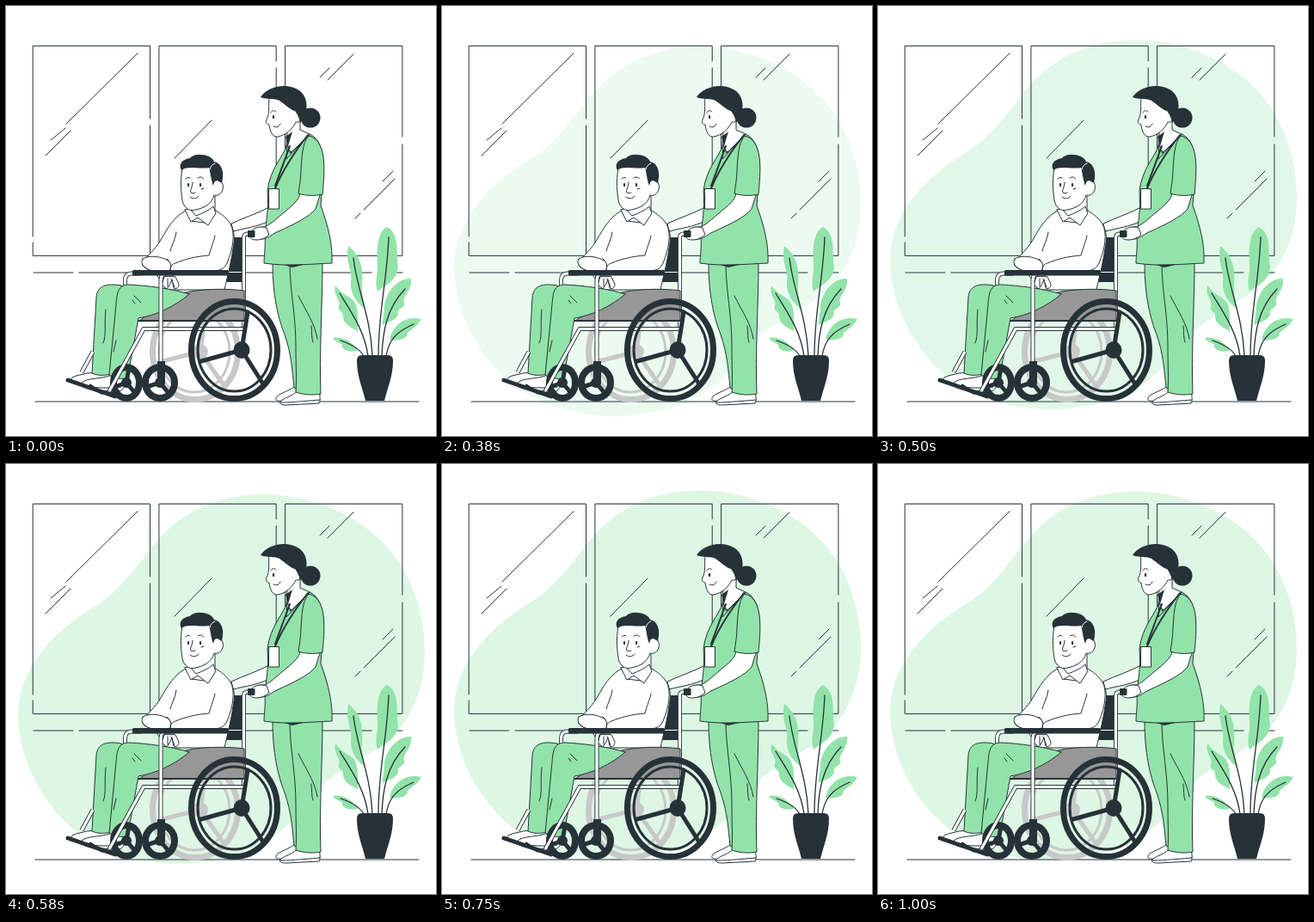
An HTML page that plays this animation: 500x500 px, repeating every 1040 ms.

```html
<!DOCTYPE html>
<html lang="en">
<head>
<meta charset="utf-8">
<title>Nurse and patient</title>
<style>
  html, body { margin: 0; width: 100%; height: 100%; overflow: hidden; background: #fff; }
  svg { display: block; width: 100vw; height: 100vh; }
  path, ellipse, circle, rect { stroke-linecap: round; stroke-linejoin: round; }
  .line { fill: none; stroke: #263238; }
  .white { fill: #fff; stroke: #263238; }
  .gap { fill: none; stroke: #fff; }
  .green { fill: #92e3a9; stroke: #263238; }
  .leaf { fill: #92e3a9; }
  .dark { fill: #263238; }
  .grey { fill: #979797; stroke: #263238; }
  .edge { fill: none; stroke: #263238; stroke-width: 5; stroke-linecap: butt; }
  .core { fill: none; stroke: #fff; stroke-width: 3.2; stroke-linecap: butt; }
</style>
</head>
<body>
<svg viewBox="0 0 500 500">
  <path id="blob" fill="#92e3a9" fill-opacity=".305" d="M300 32C355 32 410 55 445 95C475 130 487 175 487 215C487 255 473 292 447 315C425 335 398 346 375 364C350 384 337 410 318 425C298 441 275 451 250 456C200 467 150 461 105 439C50 410 14 345 14 288C14 238 50 194 103 162C138 142 160 100 188 73C217 46 255 32 300 32Z"/>
  <g id="scene"></g>
</svg>
<script>
const NS = 'http://www.w3.org/2000/svg';
const scene = document.getElementById('scene');

function add(tag, cls, attrs) {
  const el = document.createElementNS(NS, tag);
  if (cls) el.setAttribute('class', cls);
  for (const k in attrs) el.setAttribute(k, attrs[k]);
  scene.append(el);
}
const path = (cls, d, width) => add('path', cls, width ? { d, 'stroke-width': width } : { d });
const oval = (cls, cx, cy, rx, ry = rx) => add('ellipse', cls, { cx, cy, rx, ry });
const tube = d => { path('edge', d); path('core', d); };
const ring = (cx, cy, rx, ry, stroke, width) =>
  add('ellipse', '', { cx, cy, rx, ry, fill: 'none', stroke, 'stroke-width': width });

function room() {
  path('line', 'M167.5 131V46.4H31.2V268M31.2 275V290.4H167.5V139');
  path('line', 'M314.2 64V46.4H177.9V290.4H314.2V72');
  path('line', 'M460.9 152V46.4H324.6V290.4H460.9V161');
  path('line', 'M153 55L70 137M69 142L52 156M75 145L46 174M239 133L196 177' +
    'M376 72L365 83M404 56L374 86M450 192L438 204M452 201L416 237M412 241L406 247');
  path('line', 'M32 310H78M85 310H425M433 310H461M34 460H480');
}

function plant() {
  path('leaf', 'M443 257C431 263 431 285 432 300C433 312 428 320 432 332C440 325 455 320 456 303C453 290 459 265 443 257Z');
  path('leaf', 'M398 279C394 300 404 309 401 321C400 335 408 345 417 352C416 342 413 334 414 325C415 311 416 294 398 279Z');
  path('leaf', 'M471 317C455 316 442 333 440 348C440 359 437 365 438 371C446 367 456 364 456 357C454 352 465 351 463 345C460 338 473 330 471 317Z');
  path('leaf', 'M483 364C465 360 450 370 446 388C453 389 463 388 467 383C464 378 476 377 483 364Z');
  path('leaf', 'M383 325C380 338 390 341 387 349C384 354 394 356 392 362C393 370 401 374 409 378C409 366 410 357 407 348C403 337 392 338 383 325Z');
  path('leaf', 'M380 386C389 384 403 389 409 401C400 403 392 400 391 396C392 391 383 392 380 386Z');
  path('line', 'M445 269C443 320 433 355 433 407M404 293C408 330 424 360 426 407M464 329C442 352 438 380 437 407' +
    'M474 370C453 379 445 389 442 407M388 334C402 357 417 378 421 407M389 389C401 393 411 398 416 407', 1.3);
  path('dark', 'M408 412Q408 406 414 406H444Q450 406 450 412C450 431 444 442 440 459H418C414 442 408 431 408 412Z');
}

function farWheel() {
  const c = '#c8c8c8';
  ring(220, 402, 49.5, 55.5, c, 7);
  ring(219, 402, 41, 47, c, 3);
  add('path', '', { d: 'M226 402L232 357M226 402L182 413M226 402L251 438', stroke: c, 'stroke-width': 5 });
  add('circle', '', { cx: 226, cy: 402, r: 9, fill: c });
}

function nurse() {
  // far arm
  path('white', 'M306 234C293 241 277 246 262 253L264 262C279 258 292 257 306 250Z');
  // legs and shoes
  path('white', 'M335 443C328 448 319 450 315 454C312 458 315 460 321 459L340 456L339 444Z');
  path('green', 'M310 299C310 335 316 362 324 382C332 405 333 425 335 444L342 448L352 299Z');
  path('white', 'M338 448C335 453 325 455 320 459C317 462 319 464 326 464L364 462C366 458 365 453 364 448Z');
  path('line', 'M318 461C330 461 340 460 365 458');
  path('green', 'M330 299C330 330 337 360 337 395C337 420 338 432 337 449C346 452 356 453 366 451C364 408 368 345 368 299Z');
  path('line', 'M340 337C350 357 359 369 362 387M355 372C356 380 355 386 357 391');
  path('dark', 'M317 299H354L333 304Z');
  // neck and face
  path('white', 'M327 143L326 164L334 172L353 149L342 144V128Z');
  path('dark', 'M325 152L333 146L328 163Z');
  path('white', 'M306 106C305 116 307 125 303 132C301 136 304 138 306 138C307 146 310 153 316 152C326 150 333 143 337 135C345 137 345 122 337 121L334 105Z');
  path('line', 'M308 124C309 121 312 121 314 123M311 140C315 142 318 140 319 137');
  oval('dark', 311, 129, 1.2, 2.2);
  // hair
  oval('dark', 354, 130, 11.5, 11.5);
  path('dark', 'M296 106C302 95 324 88 339 97C350 103 352 117 347 128L342 136C341 130 339 126 336 122C331 121 325 115 318 110C312 107 303 109 296 106Z');
  // tunic
  path('green', 'M327 161C322 176 307 189 304 215C306 237 302 252 301 268C302 281 300 290 300 299C326 303 354 300 379 299C380 278 375 257 366 232L369 190C370 171 365 154 353 149L331 171Z');
  path('line', 'M327 161L326 178L353 149');
  path('line', 'M330 163L313 209', 2);
  path('line', 'M351 150C337 168 322 190 313 212', 2);
  add('rect', 'white', { x: 306, y: 212.5, width: 11.5, height: 23.5 });
  // near arm
  path('white', 'M342 218C341 225 334 231 328 236C318 244 309 253 301 257C293 256 288 260 283 264C284 270 291 273 298 271C306 270 309 265 317 262C334 254 352 246 360 236L365 220Z');
  path('green', 'M352 151C344 159 344 178 343 190C343 201 341 210 340 218C350 221 359 221 368 219C369 207 371 190 369 176C367 161 361 153 352 151Z');
}

function chairBack() {
  path('dark', 'M263 269H275V321H256Z');
  path('gap', 'M257 309.500H274');
  tube('M276.5 375V269Q276.5 265 281 265H285');
  path('white', 'M287 260C291 257 297 256 303 258L306 266C301 270 297 272 291 272C286 272 283 270 285 268Z');
  add('rect', 'dark', { x: 281, y: 261, width: 8.500, height: 8, rx: 1 });
  tube('M158 311H146Q138.500 311 138.500 319V328');
}

function man() {
  // shirt
  path('white', 'M207 239C195 246 188 258 180 272C173 284 163 291 159 299C157 304 166 307 172 308L187 330H254C257 316 261 302 264 282C268 263 264 250 244 238Z');
  path('line', 'M198 263C197 272 192 279 191 285M187 294C191 297 192 301 192 307');
  path('white', 'M159 294C167 289 181 291 190 297C192 300 192 305 190 308H170C163 306 155 301 159 294Z');
  path('white', 'M261 253C267 265 264 282 257 299C253 308 246 308 234 308H192C190 304 193 300 197 299C209 294 222 291 236 290C239 279 242 273 243 267');
  // neck and head
  path('white', 'M217 230L215 250L231 252L243 238V216Z');
  path('white', 'M208 237L215 251L223 246L235 255L244 241L241 233C236 238 228 241 221 244L214 236Z');
  path('white', 'M205 188C202 207 204 217 205 226C207 235 213 239 220 237C231 235 239 230 242 220C252 223 257 205 247 203L240 185Z');
  path('line', 'M209 201C211 199 213 199 214 200M223 200C226 198 228 199 230 201M217 205C217 211 213 215 215 217C216 218 218 218 220 217M214 222C217 225 222 224 224 221M227 213L230 212');
  oval('dark', 212, 208, 1.1, 2.2);
  oval('dark', 226, 208, 1.1, 2.2);
  path('dark', 'M204 191C200 184 205 178 214 177C219 170 239 172 242 181C252 183 254 195 251 206L246 203C242 203 242 206 241 209C238 201 238 194 236 188C224 190 211 185 204 191Z');
  path('gap', 'M237 190C238 186 240 184 243 183');
  // seat cushion and legs
  path('grey', 'M155 366H277V331C255 328 223 329 205 334L180 350Z');
  path('white', 'M94 427C88 429 82 429 77 432C73 437 83 440 90 440L119 442L121 426Z');
  path('green', 'M134 325C117 322 106 325 105 339L100 427C107 430 114 430 122 428L135 350Z');
  path('line', 'M116 353C114 372 117 383 113 392');
  path('white', 'M120 430C110 434 95 432 88 438C85 443 96 446 108 447L132 448C138 445 140 439 139 432Z');
  path('line', 'M88 441C101 444 116 445 134 443');
  path('green', 'M213 335C195 329 164 325 143 324C130 324 129 334 128 347L120 429C126 433 133 434 140 433C145 417 149 390 154 363C173 360 196 350 213 335Z');
  path('line', 'M149 337L157 345M147 342L150 346M128 389L125 402');
  // hanging hand
  path('white', 'M184 315L181 324L187 329C190 325 192 321 193 318L195 328C198 330 201 327 201 323L197 315Z');
  path('line', 'M188 317L188 326M192 317L196 327');
}

function caster(cx, cy, rx, ry) {
  ring(cx, cy, rx - 4, ry - 4, '#263238', 8);
  path('line', `M${cx} ${cy}L${cx + 3} ${cy - ry + 5}M${cx} ${cy}L${cx - rx + 5} ${cy + 5}M${cx} ${cy}L${cx + 10} ${cy + 12}`, 5);
  oval('dark', cx, cy, 6);
}

function chairFront() {
  caster(140, 438, 19, 22);
  tube('M101 402L88 426');
  path('line', 'M154 366H276', 2);
  tube('M276 375.500H160L120 448');
  path('line', 'M72 435L127 454', 5);
  path('line', 'M98 441L111 450H127', 3);
  tube('M196 311H188Q180 311 180 319V416');
  add('rect', 'dark', { x: 147, y: 307, width: 112, height: 6.500, rx: 1.5 });
  caster(179, 438, 21, 22);
  path('dark', 'M176 413H185V438H176Z');
}

function nearWheel() {
  ring(265.5, 400, 50, 56.5, '#263238', 7);
  ring(265.5, 400, 42.5, 48, '#263238', 3);
  path('line', 'M274 400L281 356M274 400L227 413M274 400L298 438', 5);
  oval('dark', 274, 400, 9.5, 10);
}

[room, plant, farWheel, nurse, chairBack, man, chairFront, nearWheel].forEach(draw => draw());

// The backdrop appears partway up its rise, overshoots and settles; its fade ends early.
const LOOP = 1040, FPS = 24, FIRST_STEP = 7;
const blob = document.getElementById('blob');
const rise = blob.animate(
  [
    { opacity: 0, transform: 'translateY(30px)' },
    { opacity: 1, offset: 0.82 },
    { opacity: 1, transform: 'translateY(0)' }
  ],
  { duration: 1000, easing: 'cubic-bezier(.36,-.01,.5,1.38)', fill: 'both' }
);
rise.pause();

const start = performance.now();
function render(now) {
  const t = Math.max(0, now - start) % LOOP;
  const step = Math.min(24, Math.floor((t + 5.1) * FPS / 1000));
  blob.style.visibility = step < FIRST_STEP ? 'hidden' : 'visible';
  rise.currentTime = step * 1000 / FPS;
  requestAnimationFrame(render);
}
render(start);
</script>
</body>
</html>
```
